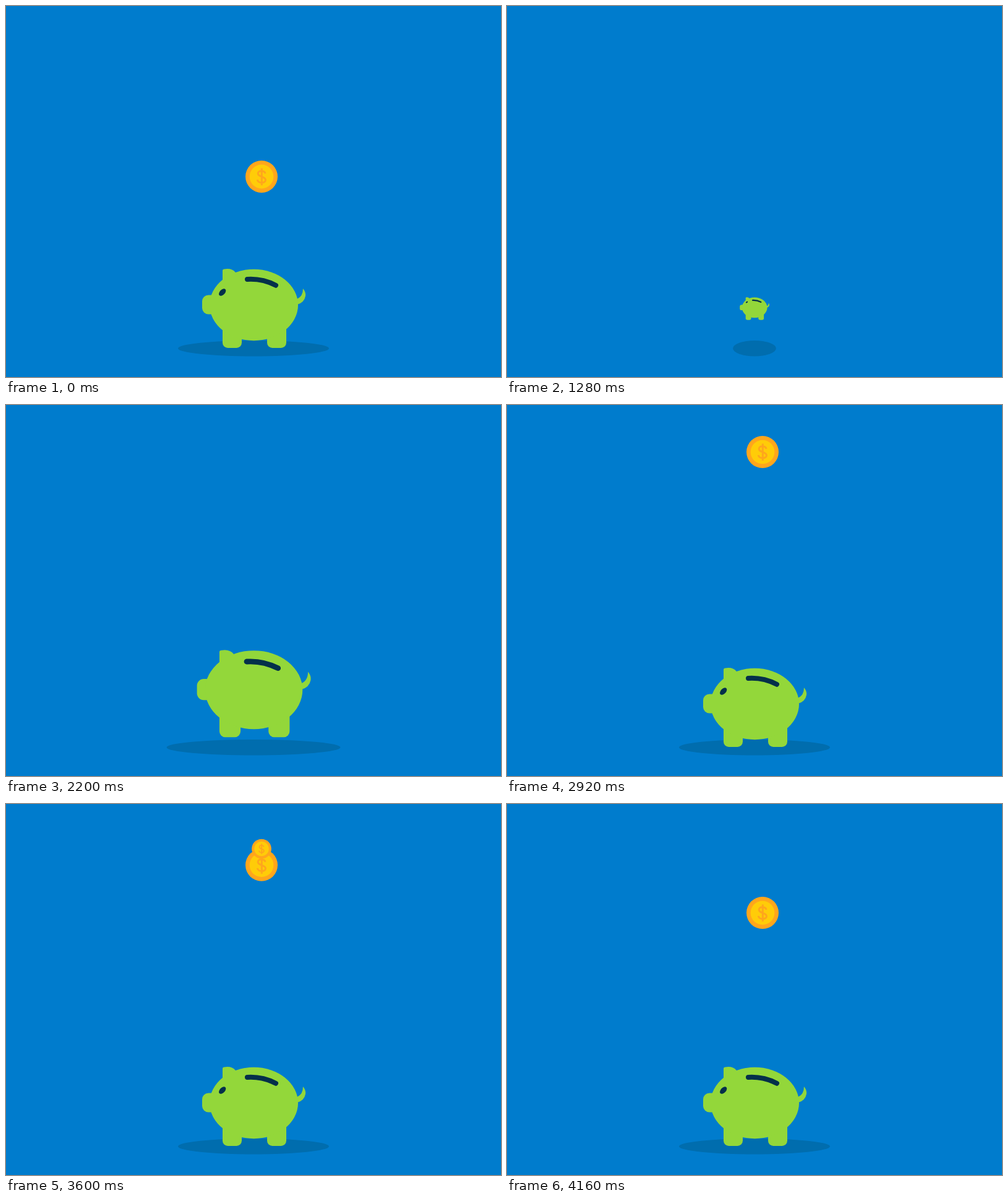
Animation, 800 px wide and 600 px high, one loop 4200 ms. Source, as an HTML page:

```html
<!DOCTYPE html>
<html lang="en">
<head>
<meta charset="utf-8">
<title>Piggy bank</title>
<style>
  html, body { margin: 0; width: 100%; height: 100%; overflow: hidden; background: #007ccd; }
  svg { display: block; width: 100%; height: 100%; }
</style>
</head>
<body>
<svg viewBox="0 0 800 600">
  <defs>
    <clipPath id="aboveSlot">
      <path d="M0 -100H800V452H436Q414 441 390 442H0Z"/>
    </clipPath>
    <g id="coin">
      <circle r="26" fill="#ffa61c"/>
      <circle r="19.3" fill="#ffcc08"/>
      <path d="M6 -5C5 -10.3 -5.6 -10.8 -5.8 -5C-6 0.8 6.5 -0.6 6.5 5.4C6.5 11.6 -6.2 11.2 -6.6 5M0.3 -13.5V14"
        fill="none" stroke="#ffa61c" stroke-width="3"/>
    </g>
  </defs>
  <rect width="800" height="600" fill="#007ccd"/>
  <ellipse id="shadow" rx="122" ry="12.7" fill="#006dae"/>
  <g id="pig" fill="#93d73a">
    <path d="M470 474Q480 470 480 457Q485 463 484 469Q482 480 470 483Z"/>
    <path d="M350 452V428Q350 425.5 353 425.5Q365 423.5 371 431L385 445Z"/>
    <rect x="317" y="467.5" width="32" height="31" rx="10"/>
    <rect x="350" y="500" width="31" height="53" rx="8.5"/>
    <rect x="422" y="500" width="31" height="53" rx="8.5"/>
    <ellipse cx="400.5" cy="483.5" rx="71.5" ry="57.7"/>
    <path d="M390 442Q414 440.5 436 451.7" fill="none" stroke="#04304a" stroke-width="8" stroke-linecap="round"/>
    <g id="eye"><ellipse id="pupil" rx="6.9" ry="4.2" fill="#04304a"/></g>
  </g>
  <g id="coins" clip-path="url(#aboveSlot)"></g>
</svg>
<script>
const LOOP = 4200;
const COIN_STARTS = [2500, 3000, 3500];
const COIN_X = 413, REST_Y = 76, POP_Y = 72.5;
const PIG_X = 400, PIG_Y = 489.5;

const byId = id => document.getElementById(id);
const ease = (t, from, to) => {
  const x = Math.min(1, Math.max(0, (t - from) / (to - from)));
  return (1 - Math.cos(Math.PI * x)) / 2;
};
// Grows from nothing to a peak, then settles at full size.
const pop = (t, start, peakAt, end, peak) =>
  peak * ease(t, start, peakAt) - (peak - 1) * ease(t, peakAt, end);

const coins = COIN_STARTS.map(start => {
  const node = document.createElementNS('http://www.w3.org/2000/svg', 'use');
  node.setAttribute('href', '#coin');
  byId('coins').append(node);
  return { start, node };
});

function drawCoin({ start, node }, time) {
  const t = (time - start + LOOP) % LOOP;
  const scale = pop(t, 0, 200, 400, 1.2);
  const fall = 100 * (Math.max(0, t - 507) / 154) ** 3;
  const y = POP_Y + (REST_Y - POP_Y) * ease(t, 200, 400) + fall;
  node.setAttribute('visibility', scale > 0 && y < 485 ? 'visible' : 'hidden');
  node.setAttribute('transform', `translate(${COIN_X} ${y}) scale(${scale})`);
}

function drawPig(t) {
  const leaving = 1 - ease(t, 1140, 1360);
  const grow = peak => t < 1500 ? leaving : pop(t, 1642, 2042, 2362, peak);
  const scale = grow(1.2);
  const hop = -44 * (ease(t, 1842, 2042) - ease(t, 2042, 2362));
  byId('shadow').setAttribute('transform', `translate(400 553.7) scale(${grow(1.3)} 1)`);
  byId('pig').setAttribute('transform',
    `translate(${PIG_X} ${PIG_Y + hop}) scale(${scale}) translate(${-PIG_X} ${-PIG_Y})`);

  const look = t < 1500 ? ease(t, 400, 640) : 0;
  const open = t < 1500 ? 1 : ease(t, 2360, 2560);
  byId('eye').setAttribute('transform', `rotate(${12.5 * look} ${PIG_X} ${PIG_Y})`);
  byId('pupil').setAttribute('transform',
    `translate(349.7 463) rotate(-47) scale(${open * (1 - 0.06 * look)} ${open * (1 - 0.12 * look)})`);
}

function draw(time) {
  const t = time % LOOP;
  drawPig(t);
  coins.forEach(coin => drawCoin(coin, t));
}

const began = performance.now();
function tick() {
  draw(performance.now() - began);
  requestAnimationFrame(tick);
}
tick();
</script>
</body>
</html>
```
